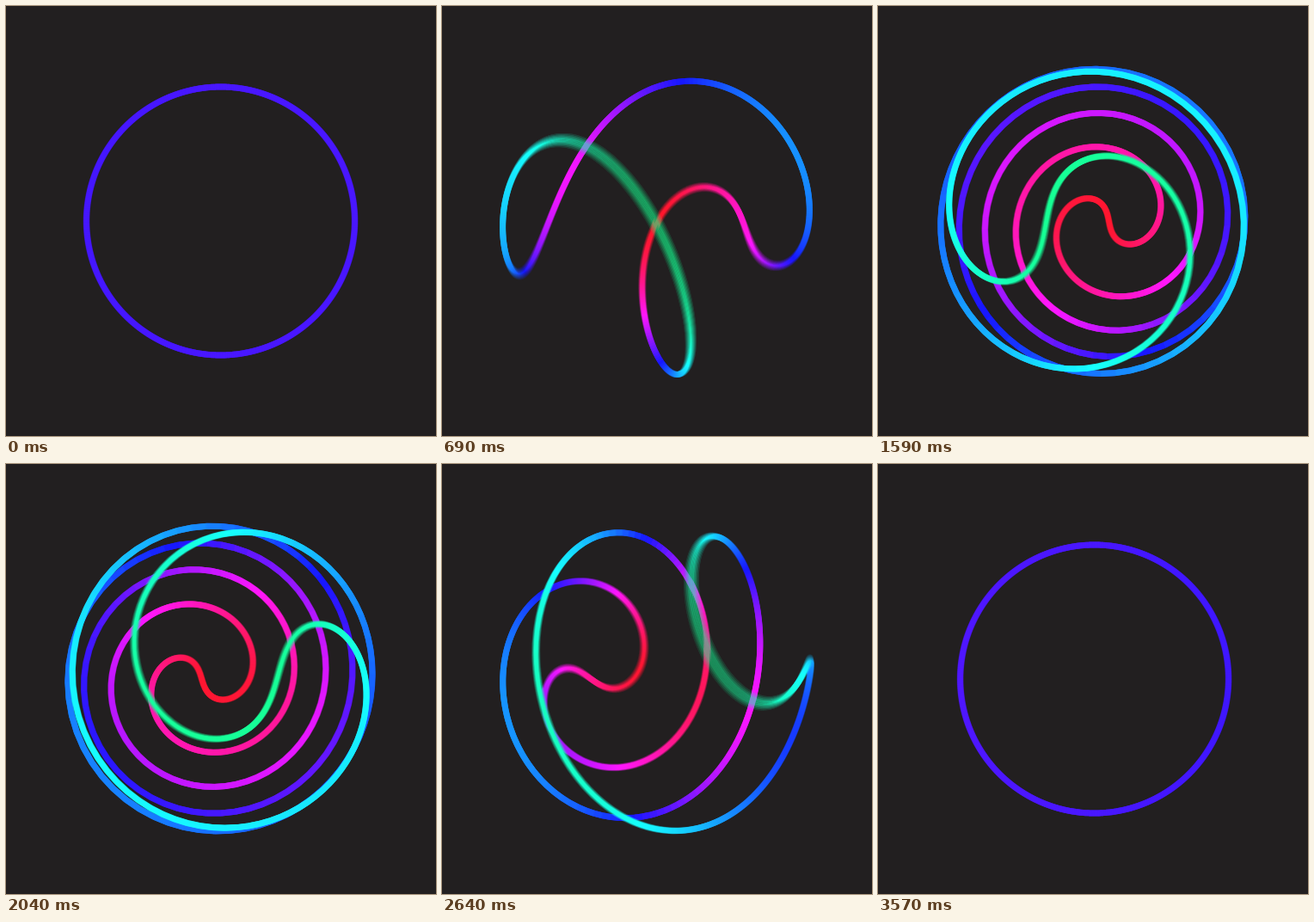
These frames come from a looping animation (500x500 px, 3.6 s). An HTML page with a canvas:

```html
<!DOCTYPE html>
<html>
<head>
<meta charset="utf-8">
<style>
  html, body { margin: 0; width: 100%; height: 100%; overflow: hidden; background: #221f20; }
  canvas { display: block; }
</style>
</head>
<body>
<canvas id="stage" width="500" height="500"></canvas>
<script>
const LOOP = 3600, STEP = 30, SHUTTER = 15, SAMPLES = 8;
const SIZE = 500, R = 156, POINTS = 540, TWIST = 3 * Math.PI;

const out = document.getElementById('stage').getContext('2d');
const layer = document.createElement('canvas');
layer.width = layer.height = SIZE;
const ctx = layer.getContext('2d');

const ease = (p, g) => p < 0.5 ? 0.5 * (2 * p) ** g : 1 - 0.5 * (2 - 2 * p) ** g;

// A ring twisted about its x axis, turned about the vertical, seen in perspective.
function project(u, turn, twist) {
  const a = Math.cos(u), r = Math.sin(u);
  const y = r * Math.cos(twist * a), b = r * Math.sin(twist * a);
  const x = a * Math.cos(turn) + b * Math.sin(turn);
  const z = b * Math.cos(turn) - a * Math.sin(turn);
  const s = R * 2 / (2 - z);
  return { x: SIZE / 2 + x * s, y: SIZE / 2 - y * s, z };
}

function drawRing(t) {
  const turn = Math.PI * t;
  const twist = TWIST * ease(1 - Math.abs(1 - 2 * t), 2.15);
  const pts = Array.from({ length: POINTS },
    (_, i) => project(2 * Math.PI * i / POINTS, turn, twist));
  const at = i => pts[i % POINTS];
  const order = pts.map((_, i) => i).sort((i, j) => at(i + 1).z - at(j + 1).z);

  ctx.fillStyle = '#221f20';
  ctx.fillRect(0, 0, SIZE, SIZE);
  ctx.lineWidth = 7;
  ctx.lineJoin = 'round';
  for (const i of order) {
    const p = at(i), q = at(i + 1), e = at(i + 2);
    ctx.strokeStyle = `hsl(${253 - 102 * q.z}, 100%, 54.5%)`;
    ctx.beginPath();
    ctx.moveTo(p.x, p.y);
    ctx.lineTo(q.x, q.y);
    ctx.lineTo(e.x, e.y);
    ctx.stroke();
  }
}

// Average several moments of the open shutter for motion blur.
function render(time) {
  for (let i = 0; i < SAMPLES; i++) {
    drawRing((time + SHUTTER * i / SAMPLES) / LOOP);
    out.globalAlpha = 1 / (i + 1);
    out.drawImage(layer, 0, 0);
  }
}

let shown = -1;
const start = performance.now();
function tick() {
  const time = Math.floor((performance.now() - start) % LOOP / STEP) * STEP;
  if (time !== shown) render(shown = time);
  requestAnimationFrame(tick);
}
tick();
</script>
</body>
</html>
```
